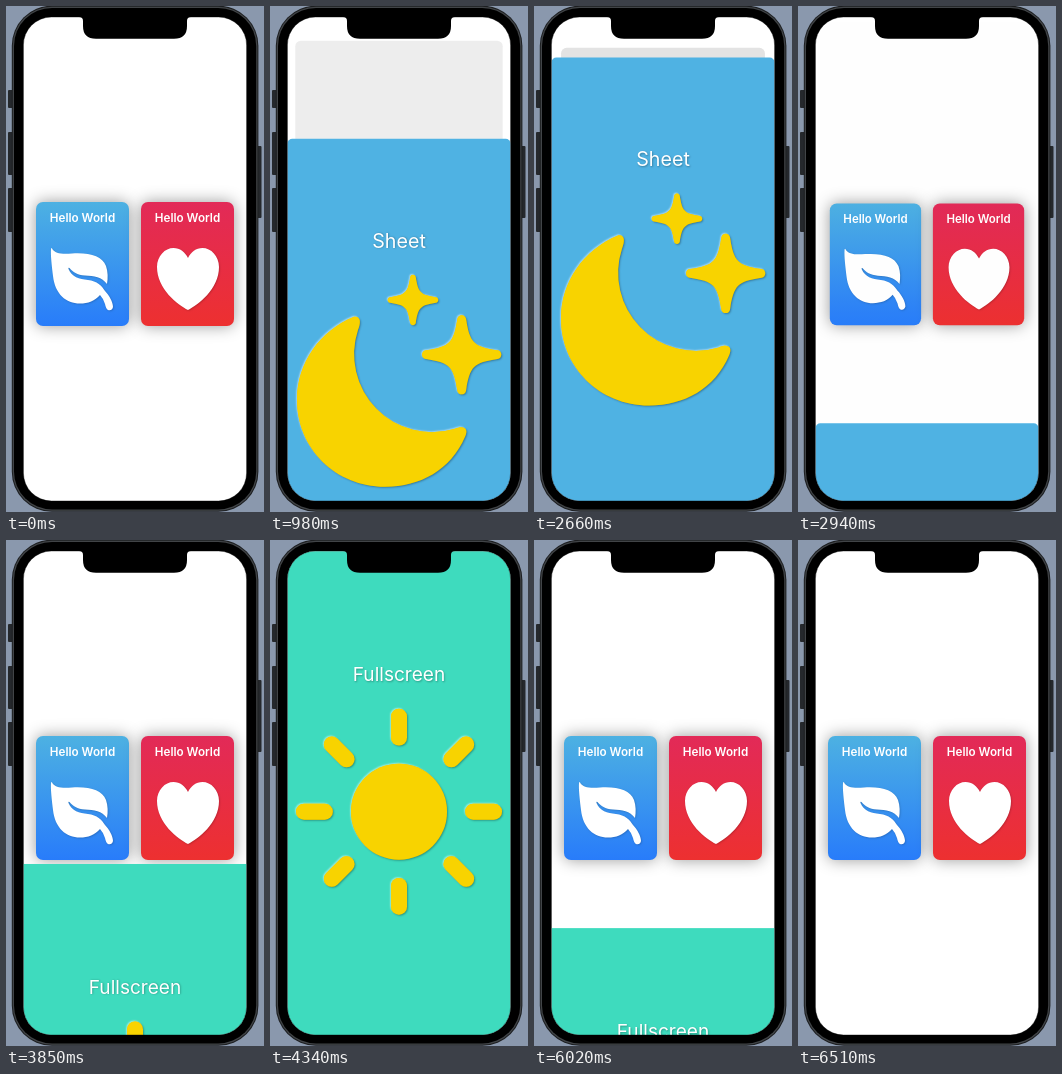
An HTML page with a canvas for the animation above (6930 ms loop, 258 by 506 pixels).

```html
<!DOCTYPE html>
<html lang="en">
<head>
<meta charset="utf-8">
<title>Sheet and fullscreen</title>
<style>
  html, body { margin: 0; width: 100%; height: 100%; overflow: hidden; background: #8a98ad; }
  canvas { display: block; width: 258px; height: 506px; }
</style>
</head>
<body>
<canvas id="stage"></canvas>
<script>
const W = 258, H = 506, LOOP = 6930, STEP = 70;
const FONT = 'Inter, "Open Sans", sans-serif';
const SCREEN = { x: 17.4, y: 11, w: 223.2, h: 484, r: 28 };
const MID = 129, SHEET_TOP = 48;
const YELLOW = '#f8d300';

const canvas = document.getElementById('stage');
const ratio = window.devicePixelRatio || 1;
canvas.width = W * ratio;
canvas.height = H * ratio;
const ctx = canvas.getContext('2d');

const leaf = new Path2D(`M46 242.5 C49 248 56 248 66 247.5 C84 246.5 96 250 100 260
  C102 266 102 272 101 278 C96 271 88 270 79 269.5 C71 269 67 266 63.5 262
  Q62 261 62.5 263 C66 271 73 273 82 274 C91 275 96 280 99 285 C103 289 107 296 107 301
  Q106 305 102 304 Q100 303 99 298 Q97 292 94 289 C89 295 82 297.5 74 297.5
  C60 297.5 49 288 47 270 C46 261 44.5 250 45 243 Q45.3 241.5 46 242.5Z`);

const heart = new Path2D(`M182 304 C172 299 151 283 151 261 C151 250 159 242 167.5 242
  C174 242 179 246 182 252 C185 246 190 242 196.5 242 C205 242 213 250 213 261
  C213 283 192 299 182 304Z`);

const moon = new Path2D(`M84 226 C91 225 91 232 88 239 A78 78 0 0 0 185 338
  C194 334 199 338 195 346 C181 379 150 396 115 396
  C66 396 27 358 27 309 C27 272 50 240 84 226Z`);

// Remaining share of a critically damped spring after ms milliseconds
function rest(ms, omega) {
  if (ms <= 0) return 1;
  const x = omega * ms / 1000;
  return (1 + x) * Math.exp(-x);
}

function box(x, y, w, h, r, fill) {
  ctx.beginPath();
  ctx.roundRect(x, y, w, h, r);
  ctx.fillStyle = fill;
  ctx.fill();
}

function label(text, x, y, size, weight) {
  ctx.font = `${weight} ${size}px ${FONT}`;
  ctx.textAlign = 'center';
  ctx.fillStyle = '#fff';
  ctx.fillText(text, x, y);
}

function shadow(color, blur, offset = 0) {
  ctx.shadowColor = color;
  ctx.shadowBlur = blur * ratio;
  ctx.shadowOffsetX = ctx.shadowOffsetY = offset * ratio;
}

function noShadow() {
  ctx.shadowColor = 'transparent';
}

// Light edge at the top left, dark edge at the bottom right
function emboss(paint) {
  shadow('rgba(255,255,255,0.45)', 1.5, -1);
  paint();
  shadow('rgba(0,0,0,0.3)', 2, 1);
  paint();
  noShadow();
}

function card(x, top, bottom, icon) {
  const fill = ctx.createLinearGradient(0, 196, 0, 320);
  fill.addColorStop(0, top);
  fill.addColorStop(1, bottom);
  shadow('rgba(0,0,0,0.4)', 16);
  box(x, 196, 93, 124, 7, fill);
  noShadow();
  label('Hello World', x + 46.5, 215.7, 11.7, 600);
  shadow('rgba(0,0,0,0.2)', 2, 0.8);
  ctx.fill(icon);
  noShadow();
}

function home(p) {
  const cy = SCREEN.y + SCREEN.h / 2;
  const scale = 1 - 0.087 * p;
  ctx.save();
  ctx.translate(MID, cy + 10 * p * p);
  ctx.scale(scale, scale);
  ctx.translate(-MID, -cy);
  card(30, '#4db1e2', '#287cfa', leaf);
  card(135, '#e22a58', '#ed3030', heart);
  if (p > 0) {
    box(SCREEN.x, SCREEN.y, SCREEN.w, SCREEN.h, 6, `rgba(0,0,0,${0.11 * p * p})`);
  }
  ctx.restore();
}

function star(x, y, r) {
  ctx.save();
  ctx.translate(x, y);
  ctx.scale(r, r);
  ctx.beginPath();
  ctx.moveTo(-0.11, -0.9);
  for (let i = 0; i < 4; i++) {
    ctx.bezierCurveTo(-0.09, -1.03, 0.09, -1.03, 0.11, -0.9);
    ctx.bezierCurveTo(0.2, -0.3, 0.3, -0.2, 0.9, -0.11);
    ctx.rotate(Math.PI / 2);
  }
  ctx.fill();
  ctx.restore();
}

function night() {
  ctx.fillStyle = YELLOW;
  ctx.fill(moon);
  star(143, 209.3, 25.3);
  star(191.7, 264, 39.7);
}

function title(text, y, size) {
  shadow('rgba(0,0,0,0.3)', 2, 0.8);
  label(text, MID, y, size, 400);
  noShadow();
}

function sheet(p) {
  ctx.save();
  ctx.translate(0, 450 * (1 - p));
  box(SCREEN.x, SHEET_TOP, SCREEN.w, 470, [5, 5, 0, 0], '#4fb2e3');
  title('Sheet', 156.8, 19.7);
  emboss(night);
  ctx.restore();
}

function sun() {
  ctx.fillStyle = YELLOW;
  ctx.beginPath();
  ctx.arc(MID, 271.5, 48, 0, Math.PI * 2);
  ctx.fill();
  for (let i = 0; i < 8; i++) {
    ctx.save();
    ctx.translate(MID, 271.5);
    ctx.rotate(i * Math.PI / 4);
    box(-8, -103, 16, 36.8, 8, YELLOW);
    ctx.restore();
  }
}

function fullscreen(p, closing) {
  const dy = SCREEN.h * (1 - p);
  // The layout recentres once the view leaves the safe area
  const lift = closing ? Math.min(dy / 2, 19.5) : 0;
  ctx.save();
  ctx.translate(0, dy);
  ctx.fillStyle = '#3edbbe';
  ctx.fillRect(SCREEN.x, SCREEN.y, SCREEN.w, SCREEN.h);
  ctx.translate(0, -lift);
  title('Fullscreen', 140.6, 19.1);
  emboss(sun);
  ctx.restore();
}

function device() {
  ctx.fillStyle = '#8a98ad';
  ctx.fillRect(0, 0, W, H);
  for (const [y, h] of [[84, 18], [126, 43], [182, 44]]) box(2, y, 5, h, 1, '#25282c');
  box(251, 140, 4.5, 72, 1, '#25282c');
  box(5.8, -0.3, 246.6, 506, 40, '#1c1e20');
  box(6.8, 0.7, 244.6, 504, 39, '#414447');
  box(8, 1.9, 242.2, 501.6, 38, '#000');
}

function screenPath() {
  ctx.beginPath();
  ctx.roundRect(SCREEN.x, SCREEN.y, SCREEN.w, SCREEN.h, SCREEN.r);
}

function notch() {
  ctx.fillStyle = '#000';
  ctx.beginPath();
  ctx.moveTo(73, 10);
  ctx.lineTo(185, 10);
  ctx.lineTo(185, 11);
  ctx.quadraticCurveTo(181, 11, 181, 15);
  ctx.lineTo(181, 20);
  ctx.quadraticCurveTo(181, 32.8, 168, 32.8);
  ctx.lineTo(90, 32.8);
  ctx.quadraticCurveTo(77, 32.8, 77, 20);
  ctx.lineTo(77, 15);
  ctx.quadraticCurveTo(77, 11, 73, 11);
  ctx.fill();
}

function draw(t) {
  const rising = 1 - rest(t - 812, 18.3);
  const sheetOpen = t < 2660 ? rising : rest(t - 2648, 10.75);
  const pushed = t < 2660 ? rising : rest(t - 2648, 10);
  const closing = t >= 5810;
  let fullOpen = closing ? rest(t - 5769, 11.4) : 1 - rest(t - 3782, 18.3);
  if (t >= 6510) fullOpen = 0;

  ctx.setTransform(ratio, 0, 0, ratio, 0, 0);
  device();
  ctx.save();
  screenPath();
  ctx.clip();
  ctx.fillStyle = '#fff';
  ctx.fillRect(0, 0, W, H);
  home(pushed < 0.002 ? 0 : pushed);
  if (sheetOpen > 0.001) sheet(sheetOpen);
  if (fullOpen > 0.001) fullscreen(fullOpen, closing);
  ctx.restore();

  // Soft rim where the display meets the bezel
  screenPath();
  ctx.strokeStyle = 'rgba(0,0,0,0.4)';
  ctx.lineWidth = 1;
  ctx.stroke();
  notch();
}

function tick() {
  const t = performance.now() % LOOP;
  draw(Math.floor(t / STEP) * STEP);
  requestAnimationFrame(tick);
}
tick();
</script>
</body>
</html>
```
